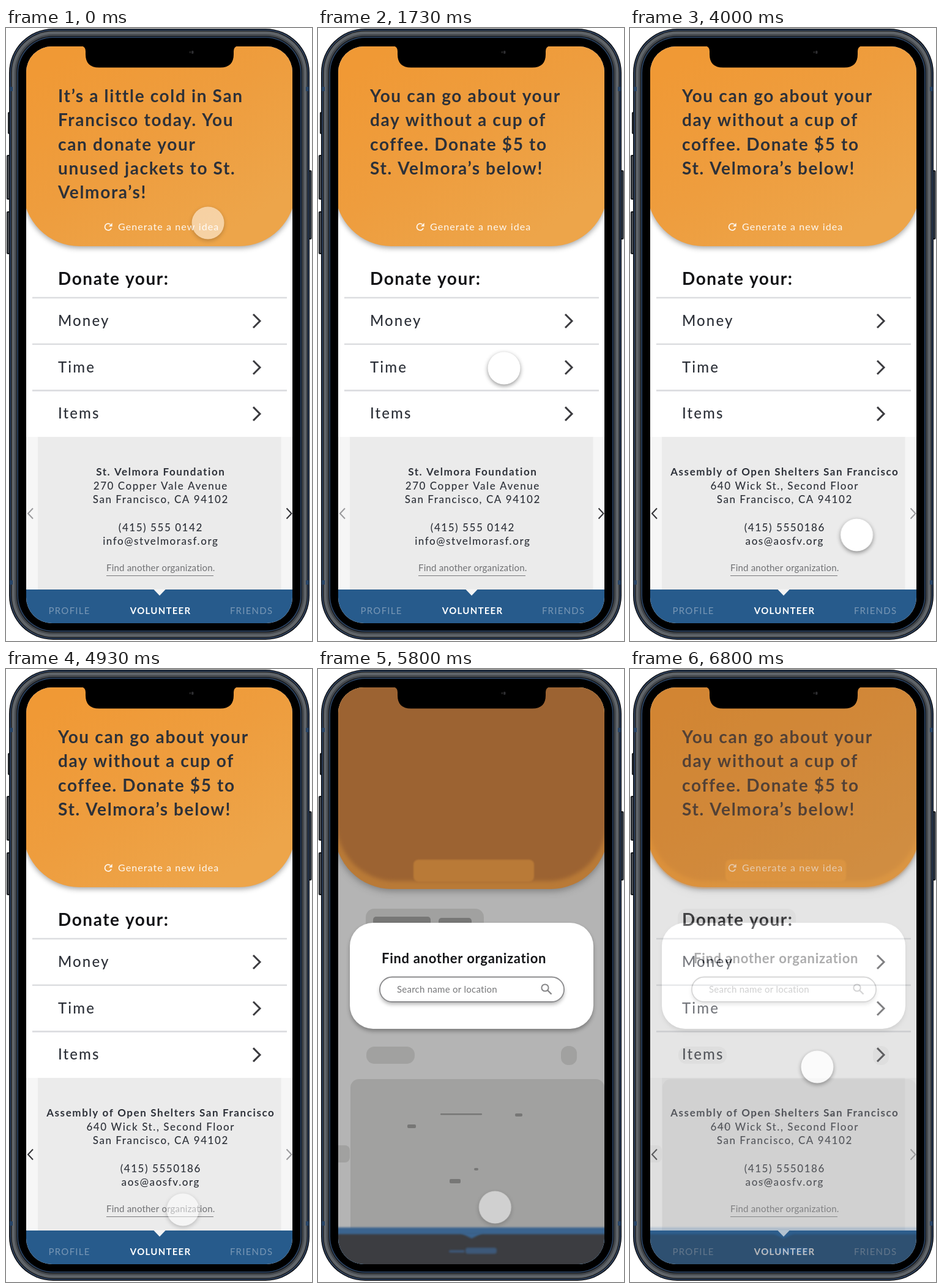
These frames come from a looping animation (500 px wide and 1000 px high, 6.87 s). An HTML page with a canvas:

```html
<!DOCTYPE html>
<html lang="en">
<head>
<meta charset="utf-8">
<title>Volunteer app</title>
<style>
  html, body { margin: 0; width: 100%; height: 100%; overflow: hidden; background: #fff; }
  canvas { display: block; width: 500px; height: 1000px; }
</style>
</head>
<body>
<canvas id="stage" width="500" height="1000"></canvas>
<script>
const LOOP = 6870;
const INK = '#2d3139';
const FONT = 'Lato, "Open Sans", sans-serif';
const stage = document.getElementById('stage').getContext('2d');

const ideas = [
  ['It’s a little cold in San', 'Francisco today. You', 'can donate your', 'unused jackets to St.', 'Velmora’s!'],
  ['You can go about your', 'day without a cup of', 'coffee. Donate $5 to', 'St. Velmora’s below!']
];
const contacts = [
  ['St. Velmora Foundation', '270 Copper Vale Avenue', 'San Francisco, CA 94102', '(415) 555 0142', 'info@stvelmorasf.org'],
  ['Assembly of Open Shelters San Francisco', '640 Wick St., Second Floor', 'San Francisco, CA 94102', '(415) 5550186', 'aos@aosfv.org']
];

// Timing helpers
const clamp = v => Math.min(1, Math.max(0, v));
const ramp = (t, start, length) => clamp((t - start) / length);
const mix = (a, b, p) => a + (b - a) * p;
const ease = p => (1 - Math.cos(Math.PI * p)) / 2;

// Drawing helpers
function layer() {
  const c = document.createElement('canvas');
  c.width = 500;
  c.height = 1000;
  return c.getContext('2d');
}

function box(g, x, y, w, h, r, fill) {
  g.beginPath();
  g.roundRect(x, y, w, h, r);
  if (fill) {
    g.fillStyle = fill;
    g.fill();
  }
}

function line(g, points, color, width) {
  g.beginPath();
  points.forEach(([x, y]) => g.lineTo(x, y));
  g.strokeStyle = color;
  g.lineWidth = width;
  g.stroke();
}

function poly(g, points, color) {
  g.beginPath();
  points.forEach(([x, y]) => g.lineTo(x, y));
  g.fillStyle = color;
  g.fill();
}

function text(g, str, x, y, size, weight, color, spacing, centered) {
  g.font = `${weight} ${size}px ${FONT}`;
  g.letterSpacing = spacing + 'px';
  g.textAlign = centered ? 'center' : 'left';
  g.fillStyle = color;
  g.fillText(str, centered ? x + spacing / 2 : x, y);
}

function shadow(g, color, blur, dy) {
  g.shadowColor = color;
  g.shadowBlur = blur;
  g.shadowOffsetY = dy;
}

const noShadow = g => shadow(g, 'transparent', 0, 0);

function screenClip(g) {
  box(g, 33, 30, 435, 941, 42);
  g.clip();
}

function drawPhone(g) {
  [[3, 137, 36], [1, 207, 73], [1, 299, 70]].forEach(([x, y, h]) => {
    box(g, x, y, 7, h, 2, '#15181c');
    box(g, x + 1.5, y + 2, 3, h - 4, 1, '#4a4e54');
  });
  box(g, 493, 232, 6.5, 113, 2, '#15181c');
  box(g, 495, 234, 2.5, 109, 1, '#3c4a5c');

  const rims = [
    [0, '#0b0d10'], [1.5, '#33496a'], [3, '#1a1c1f'], [4.5, '#5f6469'],
    [9, '#45494e'], [12, '#16191d'], [13.5, '#2c476a'], [15, '#000']
  ];
  rims.forEach(([d, color]) => box(g, 5 + d, 1 + d, 491 - 2 * d, 997 - 2 * d, 72 - d, color));
  for (const y of [96, 901]) {
    box(g, 6, y, 5, 7, 0, '#274467');
    box(g, 490, y, 5, 7, 0, '#274467');
  }
}

function drawNotch(g) {
  g.beginPath();
  g.moveTo(122, 29);
  g.quadraticCurveTo(130, 30, 130, 38);
  g.lineTo(130, 43);
  g.quadraticCurveTo(130, 64.5, 152, 64.5);
  g.lineTo(350, 64.5);
  g.quadraticCurveTo(372, 64.5, 372, 43);
  g.lineTo(372, 38);
  g.quadraticCurveTo(372, 30, 380, 29);
  g.fillStyle = '#000';
  g.fill();
  box(g, 300, 38, 1.5, 3, 0, '#333');
  box(g, 303, 37, 3.5, 5, 1.5, '#2d2d30');
}

function drawHeader(g) {
  const fill = g.createLinearGradient(120, 30, 330, 356);
  fill.addColorStop(0, '#f09935');
  fill.addColorStop(0.5, '#ee9d3e');
  fill.addColorStop(1, '#eda54a');
  shadow(g, 'rgba(0,0,0,.35)', 9, 3);
  box(g, 28, 0, 445, 356, [0, 0, 92, 92], fill);
  noShadow(g);

  const pale = 'rgba(255,255,255,.92)';
  g.beginPath();
  g.arc(167, 324.5, 5.4, 0.35, 5.4);
  g.strokeStyle = pale;
  g.lineWidth = 1.7;
  g.stroke();
  poly(g, [[173.6, 318], [173.6, 323.8], [167.8, 323.8]], pale);
  text(g, 'Generate a new idea', 183, 330, 16, 400, pale, 1.1);
}

function drawIdea(g, lines) {
  lines.forEach((s, i) => text(g, s, 85, 121 + i * 39.25, 28, 700, INK, 1.65));
}

function drawMenu(g) {
  text(g, 'Donate your:', 85, 418.5, 28, 700, '#111215', 1.55);
  ['Money', 'Time', 'Items'].forEach((s, i) => {
    const y = 440 + i * 75.7;
    line(g, [[43, y], [459, y]], '#dcdde0', 2.6);
    text(g, s, 85, y + 46, 24, 500, INK, 2.1);
    line(g, [[404, y + 27], [415, y + 38], [404, y + 49]], '#3c3c40', 3);
  });
}

function drawContact(g, [name, street, city, phone, mail]) {
  text(g, name, 252, 730, 17, 700, INK, 1.6, true);
  [[street, 752.5], [city, 775], [phone, 820.5], [mail, 843]].forEach(
    ([s, y]) => text(g, s, 252, y, 17, 500, INK, 1.55, true));
}

function drawArrows(g, second) {
  const dim = '#9b9b9d', dark = '#333337';
  line(g, [[44, 783.5], [36, 792], [44, 800.5]], second ? dark : dim, 2);
  line(g, [[458.5, 783.5], [466.5, 792], [458.5, 800.5]], second ? dim : dark, 2);
}

function drawCard(g) {
  box(g, 33, 667, 435, 250, 0, '#f6f6f6');
  box(g, 52, 667, 397.5, 250, 0, '#ebebeb');
  text(g, 'Find another organization.', 164, 886, 15, 400, '#707174', 0.2);
  line(g, [[164, 893.5], [339, 893.5]], '#77787b', 1.2);
}

function drawNav(g) {
  box(g, 33, 916, 435, 56, 0, '#275b8c');
  poly(g, [[241, 915.5], [261, 915.5], [251, 926]], '#f4f4f4');
  text(g, 'PROFILE', 103, 955.5, 15, 400, '#7897b5', 1.25, true);
  text(g, 'VOLUNTEER', 252, 955.5, 15, 700, '#fff', 1.25, true);
  text(g, 'FRIENDS', 400.5, 955.5, 15, 400, '#7897b5', 1.25, true);
}

function drawBackdrop(g) {
  const mid = '#a1a1a0', low = '#777776';
  box(g, 33, 30, 435, 941, 0, '#b4b4b4');
  shadow(g, 'rgba(70,70,70,.5)', 12, 3);
  box(g, 27, 0, 447, 359, [0, 0, 94, 94], '#b97a37');
  noShadow(g);

  g.filter = 'blur(3px)';
  box(g, 30, 0, 441, 346, [0, 0, 96, 96], '#9c6332');
  g.filter = 'blur(1px)';
  box(g, 156, 311, 197, 36, 8, '#b97a37');
  g.filter = 'none';

  box(g, 78, 391, 193, 40, 14, mid);
  box(g, 90, 404, 94, 20, 5, low);
  box(g, 197, 406, 54, 18, 5, low);
  box(g, 79, 616, 79, 28, 13, mid);
  box(g, 397, 615, 26, 31, 12, mid);
  box(g, 53, 669, 415, 250, [14, 14, 0, 0], mid);
  box(g, 33, 777, 19, 28, [0, 8, 8, 0], mid);
  [[146, 743, 14, 6], [200, 725, 68, 2.5], [322, 725, 12, 5], [215, 832, 18, 7], [255, 814, 7, 4]].forEach(
    ([x, y, w, h]) => box(g, x, y, w, h, 2, low));

  g.filter = 'blur(1.5px)';
  box(g, 30, 911, 441, 70, 0, '#3b648f');
  box(g, 30, 922, 441, 60, 0, '#3c3d41');
  poly(g, [[233, 920], [269, 920], [251, 929]], '#3b648f');
  box(g, 214, 948, 26, 4, 2, '#3d5878');
  box(g, 241, 944, 51, 10, 4, '#3d5878');
  g.filter = 'none';
}

function drawModal(g) {
  shadow(g, 'rgba(0,0,0,.3)', 6, 4);
  box(g, 52, 414, 398, 173, 38, '#fff');
  noShadow(g);
  text(g, 'Find another organization', 104, 479.5, 22, 700, '#141518', 0.7);

  shadow(g, 'rgba(0,0,0,.3)', 6, 4);
  box(g, 101, 502.5, 301, 40.5, 20, '#fff');
  noShadow(g);
  g.strokeStyle = '#8c8c8e';
  g.lineWidth = 1.8;
  g.stroke();
  text(g, 'Search name or location', 129, 528, 15, 400, '#77787a', 0.25);

  g.beginPath();
  g.arc(371, 520, 5.6, 0, 7);
  g.strokeStyle = '#858587';
  g.lineWidth = 2;
  g.stroke();
  line(g, [[375, 524], [381.5, 530.5]], '#858587', 2.4);
}

// Fixed layers
const base = layer();
drawPhone(base);
base.save();
screenClip(base);
box(base, 33, 30, 435, 941, 0, '#fff');
drawHeader(base);
drawMenu(base);
drawCard(base);
drawNav(base);
base.restore();

const popup = layer();
screenClip(popup);
drawBackdrop(popup);
drawModal(popup);

const dot = layer();
shadow(dot, 'rgba(0,0,0,.42)', 7, 2.5);
box(dot, 73.5, 73.5, 53, 53, 26.5, '#fff');

// Touch point: an arc to the side arrow, then straight runs
function touchAt(t) {
  if (t < 3300) {
    const p = ease(ramp(t, 730, 2000)), q = 1 - p;
    return [
      q * q * 330 + 2 * p * q * 217 + p * p * 452,
      q * q * 318 + 2 * p * q * 565 + p * p * 772
    ];
  }
  if (t < 5400) {
    const p = ease(ramp(t, 3300, 1400));
    return [mix(452, 289, p), mix(772, 882, p)];
  }
  const p = ease(ramp(t, 5664, 2557));
  return [mix(289, 330, p), mix(882, 318, p)];
}

function draw(t) {
  const idea = ramp(t, 10, 230);
  const org = ramp(t, 2980, 230);
  const closing = ramp(t, 6650, 230);
  const open = ramp(t, 4930, 200) * (1 - closing);
  const press = 1 - idea
    + ramp(t, 2740, 150) * (1 - org)
    + ramp(t, 4740, 150) * (1 - closing);

  const g = stage;
  const fade = (alpha, paint) => {
    if (alpha <= 0) return;
    g.globalAlpha = alpha;
    paint();
    g.globalAlpha = 1;
  };

  g.fillStyle = '#fff';
  g.fillRect(0, 0, 500, 1000);
  g.drawImage(base.canvas, 0, 0);
  g.save();
  screenClip(g);
  [0, 1].forEach(i => {
    fade(i ? idea : 1 - idea, () => drawIdea(g, ideas[i]));
    fade(i ? org : 1 - org, () => {
      drawContact(g, contacts[i]);
      drawArrows(g, i === 1);
    });
  });
  fade(open, () => g.drawImage(popup.canvas, 0, 0));
  const [x, y] = touchAt(t);
  fade(1 - 0.5 * press, () => g.drawImage(dot.canvas, x - 100, y - 100));
  drawNotch(g);
  g.restore();
}

// The picture advances twice every 200 ms, holding 130 then 70
function step(t) {
  const beat = t % 200;
  return t - beat + (beat < 130 ? 0 : 130);
}

const begin = performance.now();
function tick() {
  draw(step((performance.now() - begin) % LOOP));
  requestAnimationFrame(tick);
}
tick();
</script>
</body>
</html>
```
